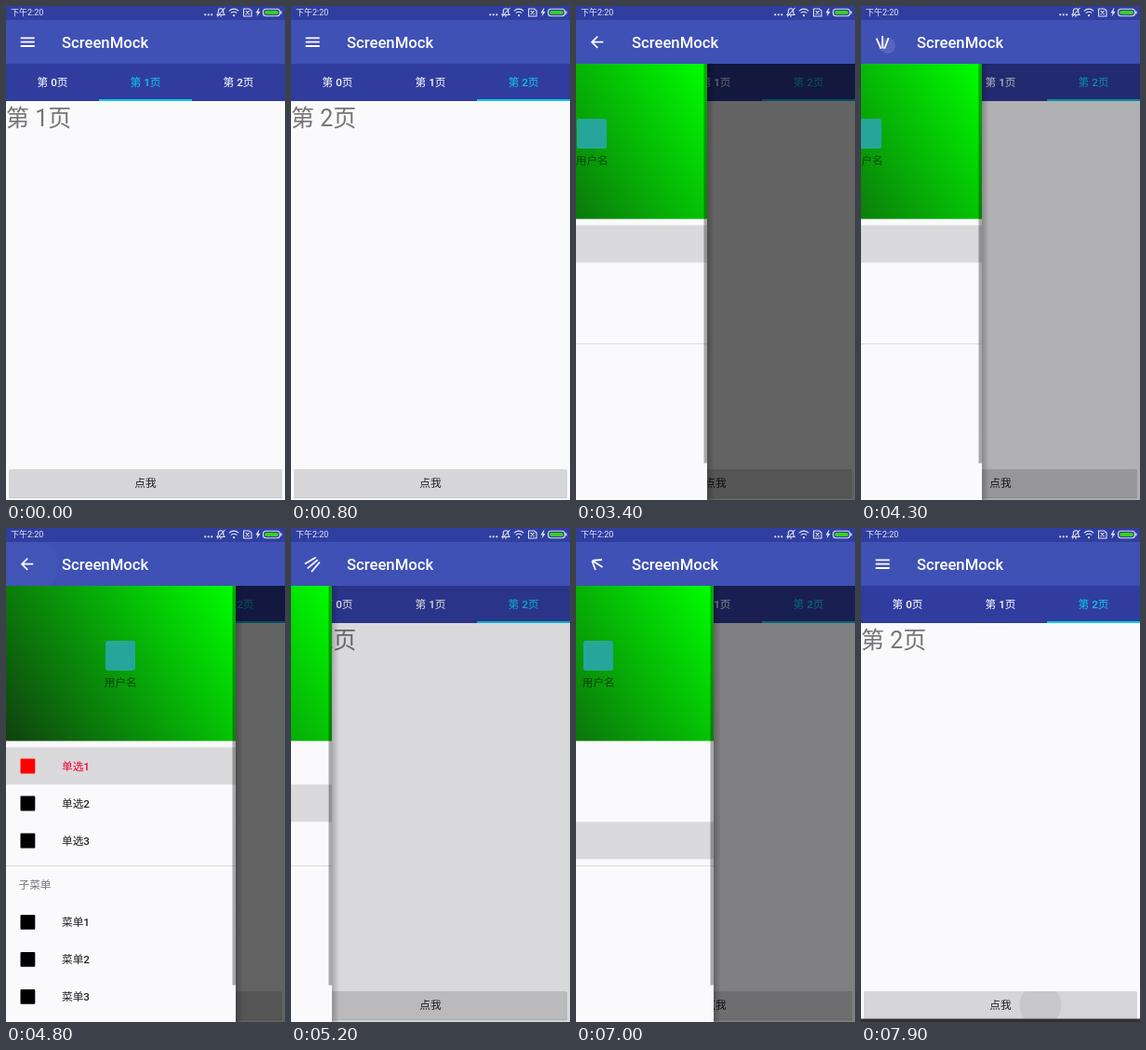
Write an HTML page that moves like this. It is 300x530 px and loops after 8 s.

```html
<!DOCTYPE html>
<html lang="zh-CN">
<head>
<meta charset="utf-8">
<title>Drawer and tabs</title>
<style>
html, body { margin: 0; width: 100%; height: 100%; overflow: hidden; background: #faf9fc; }
svg { display: block; width: 300px; height: 530px; }
text { font-family: Roboto, "Noto Sans CJK SC", "Noto Sans CJK", sans-serif; font-size: 11.67px; }
.mid { text-anchor: middle; }
.med { font-weight: 500; }
.tab { fill: #fff; }
.tab.on { fill: #10c8e6; }
.page { font-size: 25px; fill: #757575; }
.item { fill: #212121; }
.item rect { fill: #000; }
.item .row { fill: none; }
.item.on { fill: #f5002b; }
.item.on rect { fill: #f00; }
.item.on .row { fill: #dad9db; }
.line { fill: none; stroke: #dfe2f4; stroke-width: 1.1; }
</style>
</head>
<body>
<svg viewBox="0 0 300 530">
  <defs>
    <linearGradient id="green" gradientUnits="userSpaceOnUse" x1="0" y1="228" x2="247" y2="62">
      <stop offset="0" stop-color="#104010"/><stop offset="1" stop-color="#0f0"/>
    </linearGradient>
    <linearGradient id="fade">
      <stop offset="0" stop-opacity=".22"/><stop offset="1" stop-opacity="0"/>
    </linearGradient>
    <clipPath id="btnClip"><rect x="3" y="497" width="294" height="30" rx="1.5"/></clipPath>
    <clipPath id="barClip"><rect y="15" width="300" height="47"/></clipPath>
  </defs>

  <rect width="300" height="530" fill="#faf9fc"/>
  <g id="pages"></g>
  <rect y="62" width="300" height="40" fill="#303d9f"/>
  <g id="tabs"></g>
  <rect id="mark" y="100" width="100" height="2" fill="#10c8e6"/>

  <rect x="3" y="498" width="294" height="30.3" rx="1.5" fill="#000" opacity=".2"/>
  <rect x="3" y="497" width="294" height="30" rx="1.5" fill="#d6d5d9"/>
  <circle id="press" cx="193" cy="512" fill="#000" opacity=".07" clip-path="url(#btnClip)"/>
  <text class="mid" x="150" y="516.3" fill="#212121">点我</text>
  <rect id="snack" width="300" height="40" fill="#323232"/>

  <rect id="scrim" y="62" width="300" height="468"/>
  <g id="drawer">
    <rect x="247" y="62" width="8" height="468" fill="url(#fade)"/>
    <rect y="62" width="247" height="468" fill="#faf9fc"/>
    <rect y="62" width="247" height="166.5" fill="url(#green)"/>
    <rect x="107" y="121" width="32" height="32" rx="2" fill="#26a69a"/>
    <text class="mid" x="123.3" y="169.8" fill-opacity=".54">用户名</text>
    <g id="items"></g>
    <rect y="362" width="247" height="1" fill="#dcdbde"/>
    <text x="13.5" y="387.3" fill="#757575">子菜单</text>
    <rect x="243.5" y="62" width="3.5" height="428.5" fill-opacity=".33"/>
  </g>

  <rect width="300" height="15" fill="#303f9f"/>
  <rect y="15" width="300" height="47" fill="#3f51b5"/>
  <circle id="ripple" fill="#fff" clip-path="url(#barClip)"/>
  <path id="arrow" fill="none" stroke="#fff" stroke-width="1.8"/>
  <text class="med" x="60" y="45" fill="#fff" style="font-size:16.67px">ScreenMock</text>

  <text x="5" y="10.4" fill="#e6e8f6" style="font-size:9px">下午2:20</text>
  <g fill="#dfe2f4">
    <circle cx="214.2" cy="9.3" r="1.1"/><circle cx="217.7" cy="9.3" r="1.1"/><circle cx="221.2" cy="9.3" r="1.1"/>
    <path d="M271.5 2.5l-3 5h2l-1 4 4-5.5h-2.3l1.3-3.5z"/>
    <circle cx="245" cy="10.2" r="1.1"/>
  </g>
  <path class="line" d="M227 9.5h8l-1.3-2V5.5a2.7 2.7 0 0 0-5.4 0v2zM230 11h2M227 11.5l8.5-9.5
    M239.8 5.3q5.2-4.4 10.4 0M241.8 7.6q3.2-2.6 6.4 0
    M255.5 3h6l2.5 2v6h-8.5zM257.7 5.2l3.8 3.8M261.5 5.2l-3.8 3.8"/>
  <rect class="line" x="276.5" y="3.3" width="18" height="7.4" rx="3"/>
  <rect x="278.2" y="4.9" width="14.6" height="4.2" rx="1.6" fill="#35d01c"/>
  <rect x="295.3" y="5.5" width="1.3" height="3" fill="#dfe2f4"/>
</svg>

<script>
const LOOP = 8000, STEP = 100, WIDTH = 247, SETTLE = 512;
const $ = id => document.getElementById(id);
const set = (id, attrs) => {
  for (const k in attrs) $(id).setAttribute(k, attrs[k]);
};
const clamp = v => Math.min(1, Math.max(0, v));
const lerp = (a, b, u) => a + (b - a) * u;

// Drawer moves: start, open or close, delay of scrim and icon
const moves = [
  [2141, 1, 3], [3346, 0, 54], [4229, 1, 6],
  [5051, 0, 16], [5857, 1, 16], [6950, 0, 30]
];
const taps = [2200, 4229, 5857];
const picks = [3400, 5100, 7000];

const tabLabel = i => `第 ${i}页`;
$('tabs').innerHTML = [0, 1, 2].map(i =>
  `<text class="tab mid med" x="${50 + i * 100}" y="86.3">${tabLabel(i)}</text>`).join('');
$('pages').innerHTML = [0, 1, 2].map(i =>
  `<text class="page" x="${i * 300}" y="129">${tabLabel(i)}</text>`).join('');

const item = (label, y) => `<g class="item">
  <rect class="row" y="${y - 20}" width="247" height="40"/>
  <rect x="15.5" y="${y - 7.7}" width="15.8" height="15.8" rx="1"/>
  <text class="med" x="60" y="${y + 4.5}">${label}</text></g>`;
$('items').innerHTML = [1, 2, 3].map(n =>
  item('单选' + n, 215.3 + 40 * n) + item('菜单' + n, 382.7 + 40 * n)).join('');
const tabs = [...$('tabs').children];
const radios = [...$('items').children].filter((_, i) => i % 2 === 0);

function openness(start, opening, t) {
  const left = (1 - clamp((t - start) / SETTLE)) ** 5;
  return opening ? 1 - left : left;
}

// Three bars that turn into a back arrow
function drawArrow(p, mirror) {
  const cut = 0.59 * p, shaft = lerp(15, 13.33, p), head = lerp(15, 9.43, p);
  const angle = p * Math.PI / 4, off = lerp(4.3, -0.59, p), x = -shaft / 2;
  const w = head * Math.cos(angle), h = head * Math.sin(angle);
  const turn = -180 * (1 - p) * (mirror ? -1 : 1);
  set('arrow', {
    d: `M${x + cut} 0h${shaft - 2 * cut}M${x} ${off}l${w} ${h}M${x} ${-off}l${w} ${-h}`,
    transform: `translate(23.2 38.7) rotate(${turn})`
  });
}

function drawTabs(t) {
  const u = clamp((t - 50) / 730), p = u * u * (3 - 2 * u);
  const page = 1 + p;
  set('pages', { transform: `translate(${-300 * page})` });
  set('mark', { x: 100 * page });
  tabs.forEach((el, i) => el.classList.toggle('on', i === Math.round(page)));
}

function drawDrawer(t) {
  const move = moves.filter(m => m[0] <= t).pop();
  let pos = 0, late = 0;
  if (move) {
    pos = openness(move[0], move[1], t);
    late = openness(move[0], move[1], t - move[2]);
  }
  set('drawer', {
    transform: `translate(${Math.round(WIDTH * (pos - 1))})`,
    visibility: pos > 0.001 ? 'visible' : 'hidden'
  });
  set('scrim', { opacity: 0.6 * late });
  drawArrow(late, move && !move[1]);
  const chosen = picks.filter(p => p <= t).length - 1;
  radios.forEach((el, i) => el.classList.toggle('on', i === chosen));
}

function drawRipples(t) {
  const age = t - (taps.filter(p => p <= t).pop() ?? -LOOP);
  const u = clamp(age / 240), live = age > 0 && age < 650;
  set('ripple', {
    cx: lerp(31, 23, u), cy: lerp(44, 39, u),
    r: live ? 5 + 0.05 * age : 0,
    opacity: 0.14 * (1 - clamp(age / 650))
  });
  set('press', { r: t < 7800 ? 0 : lerp(10, 22.5, clamp((t - 7800) / 100)) });
  set('snack', { y: t < 7900 ? 530 : 526.5 });
}

let start;
function tick(now) {
  start ??= now;
  // The picture advances ten times a second
  const t = Math.floor(((now - start + 8) % LOOP) / STEP) * STEP;
  drawTabs(t);
  drawDrawer(t);
  drawRipples(t);
  requestAnimationFrame(tick);
}
tick(performance.now());
</script>
</body>
</html>
```
